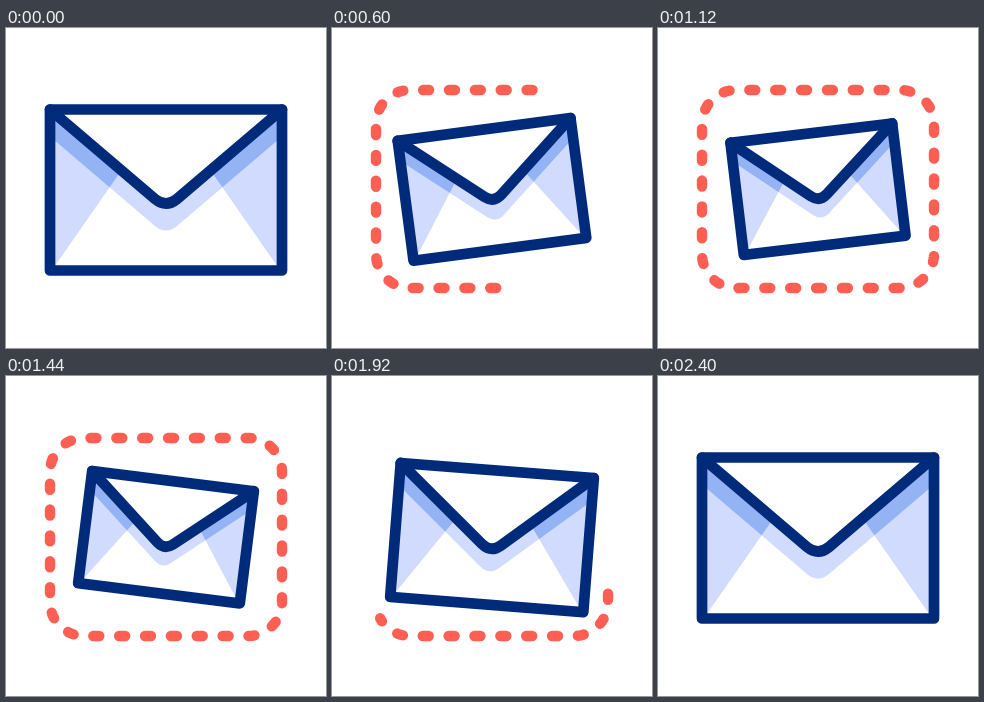
An HTML page with a canvas for the animation above (2.6 s loop, 320 by 320 pixels).

```html
<!DOCTYPE html>
<html lang="en">
<head>
<meta charset="utf-8">
<title>Envelope</title>
<style>
  html, body { margin: 0; width: 100%; height: 100%; overflow: hidden; background: #fff; }
  canvas { display: block; width: 320px; height: 320px; }
</style>
</head>
<body>
<canvas id="stage"></canvas>
<script>
const LOOP = 2600, STEP = 40;
const NAVY = '#002a7a', PALE = '#d1dbfd', MID = '#94b3f5', CORAL = '#ff5f52';
const canvas = document.getElementById('stage');
const ctx = canvas.getContext('2d');
const ratio = Math.max(1, window.devicePixelRatio || 1);
canvas.width = canvas.height = 320 * ratio;

const clamp = x => Math.min(1, Math.max(0, x));
const smooth = x => x * x * (3 - 2 * x);
const progress = (t, from, to) => clamp((t - from) / (to - from));
const ramp = (t, from, to) => smooth(progress(t, from, to));

// Cubic bezier easing with flat ends; a and b are the handle times.
function ease(x, a, b) {
  if (x <= 0 || x >= 1) return clamp(x);
  let lo = 0, hi = 1;
  for (let i = 0; i < 24; i++) {
    const m = (lo + hi) / 2, n = 1 - m;
    if (3 * n * n * m * a + 3 * n * m * m * b + m * m * m < x) lo = m; else hi = m;
  }
  return smooth(lo);
}

// Rounded track, measured clockwise from the right end of the bottom side.
const BOX = { l: 44, t: 62, r: 276, b: 260, rad: 34 };
const SIDE_W = BOX.r - BOX.l - 2 * BOX.rad;
const SIDE_H = BOX.b - BOX.t - 2 * BOX.rad;
const ARC = BOX.rad * Math.PI / 2;
const TRACK = 2 * (SIDE_W + SIDE_H) + 4 * ARC;
const DASH = 6, DASH_COUNT = 31;
const SIDES = [
  { x: BOX.r - BOX.rad, y: BOX.b, dx: -1, dy: 0, len: SIDE_W },
  { x: BOX.l, y: BOX.b - BOX.rad, dx: 0, dy: -1, len: SIDE_H },
  { x: BOX.l + BOX.rad, y: BOX.t, dx: 1, dy: 0, len: SIDE_W },
  { x: BOX.r, y: BOX.t + BOX.rad, dx: 0, dy: 1, len: SIDE_H }
];

function trackPoint(u) {
  u = ((u % TRACK) + TRACK) % TRACK;
  for (const { x, y, dx, dy, len } of SIDES) {
    if (u <= len) return [x + dx * u, y + dy * u];
    u -= len;
    if (u <= ARC) {
      const a = u / BOX.rad, s = BOX.rad * Math.sin(a), c = BOX.rad * (1 - Math.cos(a));
      return [x + dx * (len + s) - dy * c, y + dy * (len + s) + dx * c];
    }
    u -= ARC;
  }
  return [SIDES[0].x, SIDES[0].y];
}

// The trail turns a quarter of the track while it is drawn, then its tail catches up.
function drawTrail(t) {
  const base = TRACK / 4 * progress(t, 80, 1420);
  const start = base + TRACK * ease(progress(t, 1480, 2360), 0.33, 0.4);
  const end = base + TRACK * ease(progress(t, 256, 972), 0.33, 0.5);
  if (end - start < 0.05) return;
  ctx.beginPath();
  for (let u = start; u < end; u++) ctx.lineTo(...trackPoint(u));
  ctx.lineTo(...trackPoint(end));
  ctx.setLineDash([DASH, TRACK / DASH_COUNT - DASH]);
  ctx.lineCap = 'round';
  ctx.lineWidth = 10.4;
  ctx.strokeStyle = CORAL;
  ctx.stroke();
  ctx.setLineDash([]);
}

function fill(path, color) {
  ctx.fillStyle = color;
  ctx.fill(path);
}

// Envelope shapes, relative to its centre.
const HALF_W = 116, HALF_H = 80.5, DROP = 27;
const body = new Path2D();
body.rect(-HALF_W, -HALF_H, 2 * HALF_W, 2 * HALF_H);

const flap = new Path2D('M-116 -80.5L-11 9Q0 18 11 9L116 -80.5');

const shade = new Path2D(
  `M-116 -80.5L-11 9Q0 18 11 9L116 -80.5V${DROP - 80.5}L11 ${9 + DROP}Q0 ${18 + DROP} -11 ${9 + DROP}L-116 ${DROP - 80.5}Z`);

const folds = new Path2D('M-116 -80L-45 -19L-114 80H-116ZM116 -80L45 -19L114 80H116Z');

function drawEnvelope(t) {
  const shrink = ramp(t, 80, 780) - ramp(t, 1600, 2290);
  const tilt = ramp(t, 80, 780) - ramp(t, 1560, 2280);
  const swing = -1 + 2 * ramp(t, 1000, 1550);
  const scale = 1 - 0.298 * shrink;
  ctx.save();
  ctx.translate(160, 162 - 0.8 * shrink);
  ctx.rotate(9 * swing * tilt * Math.PI / 180);
  ctx.scale(scale, scale);
  fill(body, '#fff');
  fill(folds, PALE);
  fill(shade, PALE);
  ctx.save();
  ctx.clip(folds);
  fill(shade, MID);
  ctx.restore();
  ctx.lineWidth = 10.7 / scale;
  ctx.lineJoin = ctx.lineCap = 'round';
  ctx.strokeStyle = NAVY;
  ctx.stroke(flap);
  ctx.stroke(body);
  ctx.restore();
}

function render(now) {
  const t = Math.floor((now % LOOP) / STEP) * STEP;
  ctx.setTransform(ratio, 0, 0, ratio, 0, 0);
  ctx.fillStyle = '#fff';
  ctx.fillRect(0, 0, 320, 320);
  drawTrail(t);
  drawEnvelope(t);
}

const origin = performance.now();
function tick() {
  render(performance.now() - origin);
  requestAnimationFrame(tick);
}
tick();
</script>
</body>
</html>
```
